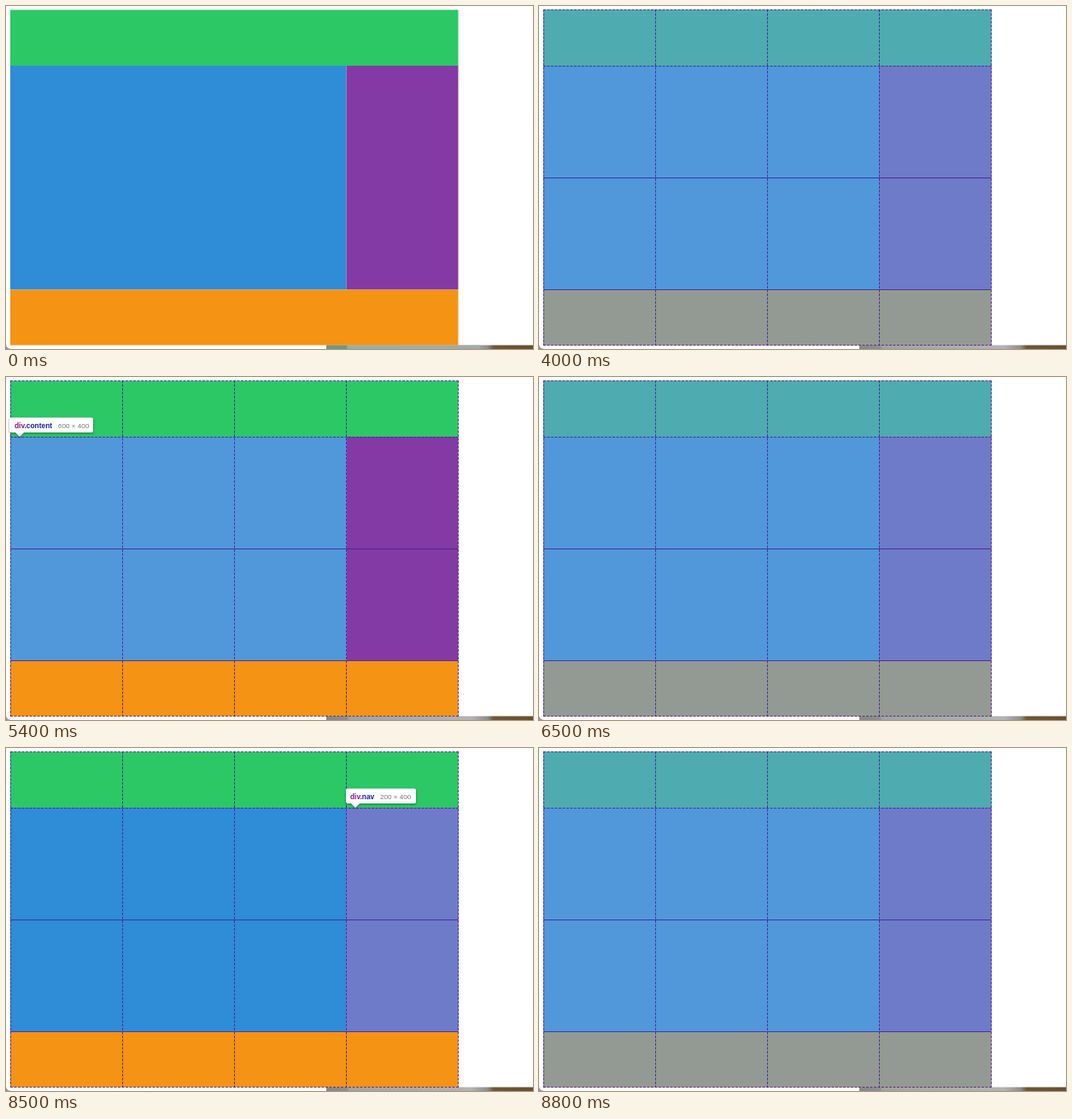
An HTML page that plays this animation: 617 px wide and 402 px high, repeating every 8.9 s.

```html
<!DOCTYPE html>
<html lang="en">
<head>
<meta charset="utf-8">
<title>Grid layout inspection</title>
<style>
html, body { margin: 0; width: 100%; height: 100%; overflow: hidden; background: #fff; }
svg { display: block; width: 617px; height: 402px; }
text { font: 8.1px "Liberation Sans", Arial, sans-serif; fill: #777; }
.name { font-weight: bold; font-size: 8.4px; fill: #1f1fa0; }
.tag { fill: #881280; }
.bubble { fill: #fff; filter: drop-shadow(0 1px 1.5px rgba(0, 0, 0, .4)); }
.lines { fill: none; stroke: #46209a; stroke-opacity: .85; }
.dash { stroke-dasharray: 3 1.5; }

.glow, .cursor, .overlay, .all, .header, .content, .nav, .footer {
  animation: 8.9s step-end infinite;
}
.glow { animation-name: glow; }
.cursor { animation-name: cursor; }
.overlay { animation-name: overlay; }
.all { animation-name: all; }
.header { animation-name: header; }
.content { animation-name: content; }
.nav { animation-name: nav; }
.footer { animation-name: footer; }

@keyframes glow {
  0% { opacity: 1; }
  4.49%, 100% { opacity: 0; }
}
@keyframes cursor {
  0%, 33.7%, 100% { opacity: 0; }
  31.46% { opacity: 1; }
}
@keyframes overlay {
  0% { opacity: 0; }
  33.7%, 100% { opacity: 1; }
}
@keyframes all {
  0%, 53.93%, 76.4% { opacity: 0; }
  33.7%, 73.03%, 98.87%, 100% { opacity: 1; }
}
@keyframes header {
  0%, 60.67%, 73.03%, 78.65%, 98.87%, 100% { opacity: 0; }
  53.93%, 70.78%, 76.4%, 97.75% { opacity: 1; }
}
@keyframes content {
  0%, 70.78%, 80.89%, 97.75%, 100% { opacity: 0; }
  60.67%, 78.65%, 96.62% { opacity: 1; }
}
@keyframes nav {
  0%, 84.26%, 96.62%, 100% { opacity: 0; }
  80.89%, 94.38% { opacity: 1; }
}
@keyframes footer {
  0%, 94.38%, 100% { opacity: 0; }
  84.26% { opacity: 1; }
}
</style>
</head>
<body>
<svg viewBox="0 0 617 402">
  <defs>
    <linearGradient id="desk">
      <stop offset="0" stop-color="#858985"/>
      <stop offset=".1" stop-color="#8c8e8d"/>
      <stop offset=".11" stop-color="#a0a2a3"/>
      <stop offset=".7" stop-color="#b2b3b5"/>
      <stop offset=".78" stop-color="#8f8d89"/>
      <stop offset=".81" stop-color="#6d5738"/>
      <stop offset="1" stop-color="#66502f"/>
    </linearGradient>
    <linearGradient id="green">
      <stop offset="0" stop-color="#6c9a84"/>
      <stop offset=".13" stop-color="#6c9a84"/>
      <stop offset=".14" stop-color="#8fb3a3"/>
      <stop offset="1" stop-color="#a5aaa7"/>
    </linearGradient>
    <path id="header" d="M5 4.5H529.5V70H5z" fill="#4eabaf"/>
    <path id="content" d="M5 70H398.5V332.5H5z" fill="#5098da"/>
    <path id="nav" d="M398.5 70H529.5V332.5H398.5z" fill="#6e7bc8"/>
    <path id="footer" d="M5 332.5H529.5V397.5H5z" fill="#939a93"/>
  </defs>

  <rect width="617" height="402" fill="#fff"/>
  <path d="M0 397Q1 401.5 6 402H0z" fill="#999"/>
  <rect x="375" y="397.5" width="242" height="4.5" fill="url(#desk)"/>
  <rect class="glow" x="375" y="397.5" width="180" height="4.5" fill="url(#green)"/>

  <path d="M5 4.5H529.5V70H5z" fill="#2cc866"/>
  <path d="M5 70H398.5V332.5H5z" fill="#2f8cd6"/>
  <path d="M398.5 70H529.5V332.5H398.5z" fill="#843aa4"/>
  <path d="M5 332.5H529.5V397.5H5z" fill="#f49314"/>

  <g class="all">
    <use href="#header"/><use href="#content"/><use href="#nav"/><use href="#footer"/>
  </g>
  <use class="header" href="#header"/>
  <use class="content" href="#content"/>
  <use class="nav" href="#nav"/>
  <use class="footer" href="#footer"/>

  <g class="overlay lines">
    <path class="dash" d="M5 4.5H529.5M5 397.5H529.5M5 70.5H529.5"/>
    <path class="dash" d="M5.5 4V398M136.5 4V398M267.5 4V398M398.5 4V398M529.5 4V398"/>
    <path d="M5 201.5H529.5M5 332.5H529.5"/>
  </g>

  <g class="header">
    <path class="bubble" d="M6 75.5H11L16 70.5L21 75.5H98Q100 75.5 100 77.5V91Q100 93 98 93H6Q4 93 4 91V77.5Q4 75.5 6 75.5z"/>
    <text class="name" x="10" y="87.3"><tspan class="tag">div</tspan>.header</text>
    <text x="58" y="87.3">800 × 100</text>
  </g>
  <g class="content">
    <path class="bubble" d="M6 47.5H100Q102 47.5 102 49.5V63Q102 65 100 65H21L16 70L11 65H6Q4 65 4 63V49.5Q4 47.5 6 47.5z"/>
    <text class="name" x="10" y="59.5"><tspan class="tag">div</tspan>.content</text>
    <text x="61" y="59.5">600 × 400</text>
  </g>
  <g class="nav">
    <path class="bubble" d="M400 47.5H478Q480 47.5 480 49.5V63Q480 65 478 65H414L409 70L404 65H400Q398 65 398 63V49.5Q398 47.5 400 47.5z"/>
    <text class="name" x="403" y="59.5"><tspan class="tag">div</tspan>.nav</text>
    <text x="438" y="59.5">200 × 400</text>
  </g>
  <g class="footer">
    <path class="bubble" d="M6 309.5H94Q96 309.5 96 311.5V325Q96 327 94 327H21L16 332L11 327H6Q4 327 4 325V311.5Q4 309.5 6 309.5z"/>
    <text class="name" x="10" y="321.5"><tspan class="tag">div</tspan>.footer</text>
    <text x="54" y="321.5">800 × 100</text>
  </g>

  <path class="cursor" d="M361.5 177.5V187L363.6 185.1L365 188.4L366.6 187.7L365.2 184.6H368z" fill="#111" stroke="#e8eef5" stroke-width=".8"/>
</svg>
</body>
</html>
```
